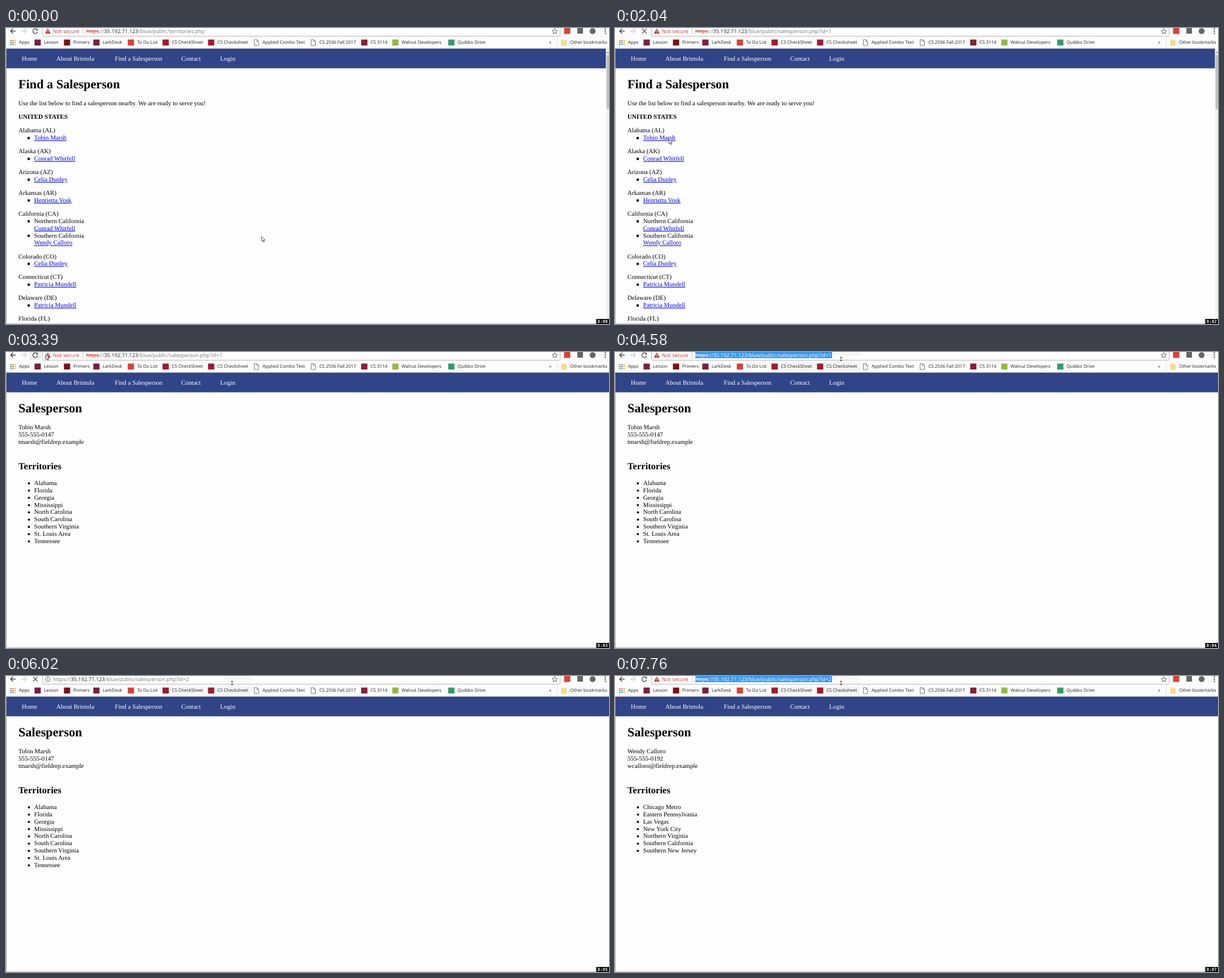
Recreate the animation shown at these times as an HTML page. Size 1067 by 525 pixels, loop 8 s.

```html
<!DOCTYPE html>
<html lang="en">
<head>
<meta charset="utf-8">
<title>Find a Salesperson</title>
<style>
html, body { margin: 0; width: 100%; height: 100%; overflow: hidden; background: #fefefe; }
svg { display: block; }
text { white-space: pre; text-rendering: geometricPrecision; }
.ui { font: 8px "Open Sans", "Noto Sans", sans-serif; fill: #222; }
.url { font: 9.25px "Open Sans", "Noto Sans", sans-serif; fill: #777; }
.page { font: 11.15px "Liberation Serif", "Times New Roman", serif; fill: #000; }
.page .h1 { font-size: 22.3px; font-weight: bold; }
.page .h2 { font-size: 16.6px; font-weight: bold; }
.page .nav { fill: #fff; }
.page .link { fill: #00e; text-decoration: underline; }
.clock { font: bold 7.4px "DejaVu Sans Mono", monospace; fill: #fff; }
</style>
</head>
<body>
<svg width="1067" height="525" viewBox="0 0 1067 525">
  <g id="chrome"></g>
  <g id="bar"></g>
  <g id="page" class="page"></g>
  <g id="top"></g>
</svg>
<script>
const LOOP = 8000, LINE = 12.86;
const $ = id => document.getElementById(id);
const text = (x, y, s, cls = '') => `<text x="${x}" y="${y}" class="${cls}">${s}</text>`;
const rect = (x, y, w, h, fill) => `<rect x="${x}" y="${y}" width="${w}" height="${h}" fill="${fill}"/>`;
const path = (d, stroke, width = 1, fill = 'none') =>
  `<path d="${d}" stroke="${stroke}" stroke-width="${width}" fill="${fill}"/>`;
const dot = (x, y, r, fill) => `<circle cx="${x}" cy="${y}" r="${r}" fill="${fill}"/>`;
const now = (steps, t) => steps.findLast(s => s[0] <= t);

// Timed states: [start, value...]
const cursors = [
  [0, 452, 369, 'arrow'], [550, 230, 268, 'arrow'], [670, 108, 209, 'arrow'], [830, 108, 212, 'arrow'],
  [980, 104, 208, 'arrow'], [1090, 99, 202, 'hand'], [1210, 97, 199, 'hand'], [1350, 95, 198, 'hand'],
  [1630, 95.5, 197, 'hand'], [1940, 95, 196, 'arrow'], [2740, 95, 223, 'arrow'], [2920, 93, 150, 'arrow'],
  [3030, 78, 50, 'arrow'], [3150, 54, 8, 'arrow'], [3270, 57, 5, 'arrow'], [3390, 70, 4, 'arrow'],
  [3510, 281, 19, 'arrow'], [3670, 395, 27, 'arrow'], [3810, 365, 25, 'arrow'], [3930, 382, 19, 'arrow'],
  [4060, 399, 17, 'arrow'], [4200, 400, 14, 'beam'], [4300, 400, 12, 'beam']
];
const addresses = [
  [0, 'territories.php'], [2040, 'salesperson.php?id=1'], [4450, 'salesperson.php?id=1', 'all'],
  [5010, 'salesperson.php?id=1', 'last'], [6020, 'salesperson.php?id=2', 'pending'],
  [6130, 'salesperson.php?id=2'], [7760, 'salesperson.php?id=2', 'all']
];
const pages = [[0, 0], [2190, 1], [6250, 2]];
const reloads = [[0, 'idle'], [1500, 'stop'], [2190, 'idle'], [3150, 'hover'], [3510, 'idle'], [6020, 'stop'], [6250, 'idle']];
const ticks = [0, 1210, 2040, 3270, 4300, 5310, 6360, 7360];

const states = [
  ['Alabama (AL)', 'Tobin Marsh'], ['Alaska (AK)', 'Conrad Whitfell'], ['Arizona (AZ)', 'Celia Dunley'],
  ['Arkansas (AR)', 'Henrietta Vosk'],
  ['California (CA)', 'Conrad Whitfell', 'Northern California', 'Wendy Calloro', 'Southern California'],
  ['Colorado (CO)', 'Celia Dunley'], ['Connecticut (CT)', 'Patricia Mundell'],
  ['Delaware (DE)', 'Patricia Mundell'], ['Florida (FL)', 'Tobin Marsh']
];
const people = [
  { lines: ['Tobin Marsh', '555-555-0147', 'tmarsh@fieldrep.example'],
    areas: ['Alabama', 'Florida', 'Georgia', 'Mississippi', 'North Carolina', 'South Carolina',
      'Southern Virginia', 'St. Louis Area', 'Tennessee'] },
  { lines: ['Wendy Calloro', '555-555-0192', 'wcalloro@fieldrep.example'],
    areas: ['Chicago Metro', 'Eastern Pennsylvania', 'Las Vegas', 'New York City', 'Northern Virginia',
      'Southern California', 'Southern New Jersey'] }
];
const bookmarks = [
  [67, 'Lesson', '#7b1e42'], [119, 'Primers', '#7d0f14'], [171, 'LarkDesk', '#7b1e42'],
  [232, 'To Do List', '#db4035'], [293.5, 'CS CheckSheet', '#a3192b'], [374, 'CS Checksheet', '#a3192b'],
  [454, 'Applied Combo Text'], [554.5, 'CS 2506 Fall 2017'], [645, 'CS 3114', '#8a1f2d'],
  [700, 'Walnut Developers', '#8fbc3f'], [799, 'Quibbo Drive', '#2f9e63']
];

function chrome() {
  let s = rect(0, 0, 1067, 37, '#fdfdfd');
  s += path('M64.5 0V12.5Q64.5 14.5 66.5 14.5H978.5Q980.5 14.5 980.5 12.5V0', '#b4b4b4', 1, '#fff');
  s += path('M17 5.5H8.5M12.5 1.2L8.2 5.5L12.5 9.8', '#444', 1.4);
  s += path('M27 5.5H36M32 1.2L36.3 5.5L32 9.8', '#d0d0d0', 1.3);
  s += path('M971 1l1.4 3.2 3.4.3-2.6 2.3.8 3.4-3-1.8-3 1.8.8-3.4-2.6-2.3 3.4-.3z', '#555', 0.9);
  s += rect(987.5, 0, 11, 10.5, '#db4035') + rect(1011, 0, 10, 10, '#666') + dot(1038, 5.5, 5.2, '#666');
  s += [1.5, 5.5, 9.5].map(y => dot(1060.5, y, 1.2, '#555')).join('');
  return s;
}

function bookmarkBar(t) {
  let s = '';
  if (t >= 3510) s += rect(273, 18, 80, 15, '#f6f6f6');
  if (t >= 3670) s += rect(354, 18, 80, 15, '#f4f4f4') + rect(384, 1, 50, 5.5, '#f5f5f5');
  const tints = ['#e2574c', '#e2574c', '#f0b429', '#3f9c5a', '#4a7fdc', '#f0b429', '#3f9c5a', '#4a7fdc', '#f0b429'];
  tints.forEach((c, i) => s += rect(7.5 + i % 3 * 3.7, 21.5 + (i / 3 | 0) * 3.4, 2.3, 2.2, c));
  s += text(23, 28.4, 'Apps');
  for (const [x, label, color] of bookmarks) {
    s += color ? rect(x - 16.5, 20.5, 11, 10.5, color)
      : path(`M${x - 14.5} 20.7h4.5l3 3v7.3h-7.5zM${x - 10} 20.7v3h3`, '#666', 0.9, '#fff');
    s += text(x, 28.4, label);
  }
  s += text(961, 28.2, '»') + rect(975, 19, 1, 13, '#ddd');
  s += path('M983 21h3.5l1 1.3h4v8.4h-8.5z', '#e8c766', 0.6, '#fbdc86');
  return `<g class="ui">${s}${text(998, 28.4, 'Other bookmarks')}</g>`;
}

function address(file, mode) {
  const all = mode == 'all', pending = mode == 'pending';
  const span = (v, fill, extra = '') => `<tspan fill="${fill}" ${extra}>${v}</tspan>`;
  const pick = c => all ? '#fff' : c;
  let s = '';
  if (pending) {
    s += `<circle cx="74" cy="5.7" r="4.3" fill="none" stroke="#666"/>` + rect(73.4, 5, 1.2, 3.2, '#666') + rect(73.4, 3, 1.2, 1.2, '#666');
  } else {
    s += path('M74 1.2L78.8 9.8H69.2z', '#c53929', 0.5, '#c53929') + rect(73.5, 4, 1, 3, '#fff') + rect(73.5, 7.8, 1, 1, '#fff');
    s += `<text x="83" y="9.1" style="fill:#c53929">Not secure</text>` + rect(136, 0, 1, 11, '#ccc');
  }
  if (all) s += rect(142, 0, 242, 11, '#3399ff');
  if (mode == 'last') s += rect(378, 0, 6, 11, '#3399ff');
  const head = file.slice(0, -1), tail = file.slice(-1);
  s += `<text x="${pending ? 83 : 142}" y="9.1">`
    + span('https', pick(pending ? '#777' : '#c53929'), pending ? '' : 'text-decoration="line-through"')
    + span('://', pick('#777')) + span('35.192.71.123', pick('#222'))
    + span('/blue/public/' + head, pick('#777')) + span(tail, mode == 'last' ? '#fff' : pick('#777')) + '</text>';
  return `<g class="url">${s}</g>`;
}

function reload(mode) {
  if (mode == 'stop') return path('M48 1.5L56 9.5M56 1.5L48 9.5', '#555', 1.3);
  return (mode == 'hover' ? rect(42, 0, 20, 14, '#ececec') : '')
    + path('M55 2.6A4.2 4.2 0 1 0 56 6.6', '#444', 1.3) + path('M56.4 .8V4.4H52.8z', 'none', 0, '#444');
}

function page(n) {
  let s = rect(0, 37, 1067, 488, '#fefefe') + rect(0, 36.5, n ? 1067 : 1061.5, 35, '#304488');
  [[28, 'Home'], [89, 'About Brintola'], [192.5, 'Find a Salesperson'], [310, 'Contact'], [379, 'Login']]
    .forEach(([x, label]) => s += text(x, 58.2, label, 'nav'));
  s += n ? person(people[n - 1]) : territories();
  return s + rect(0, 36, 1, 489, '#a8a8a8') + rect(0, 524, 1067, 1, '#b8b8b8');
}

function territories() {
  let y = 185.4;
  let s = text(22, 106.7, 'Find a Salesperson', 'h1')
    + text(22, 137.4, 'Use the list below to find a salesperson nearby. We are ready to serve you!')
    + `<text x="22" y="161.3" font-weight="bold">UNITED STATES</text>`;
  for (const [state, ...entries] of states) {
    s += text(22, y, state);
    for (let i = 0; i < entries.length; i += 2) {
      y += LINE;
      s += rect(38.2, y - 5, 4, 4, '#000');
      if (entries[i + 1]) {
        s += text(49.8, y, entries[i + 1]);
        y += LINE;
      }
      s += text(49.8, y, entries[i], 'link');
    }
    y += 24.05;
  }
  return s + rect(1062, 36, 5, 489, '#f1f1f1') + rect(1062.6, 48, 4.4, 95.5, '#c1c1c1')
    + path('M1063 44.5l2-2.5 2 2.5z', 'none', 0, '#777');
}

function person({ lines, areas }) {
  let s = text(22, 106.7, 'Salesperson', 'h1') + text(22, 207.8, 'Territories', 'h2');
  lines.forEach((l, i) => s += text(22, 137.4 + i * LINE, l));
  areas.forEach((a, i) => s += dot(40.5, 233 + i * LINE, 1.9, '#000') + text(49.8, 236 + i * LINE, a));
  return s;
}

const shapes = {
  arrow: path('M.5 .5V9.3L2.5 7.6L3.9 10.7L5.2 10.1L3.8 7.1H6.5z', '#222', 0.75, '#fff'),
  hand: path('M-1.2 8V1.2Q-1.2 .3-.3 .3T.6 1.2V5Q1.6 4.2 2.3 5.3Q3.4 4.6 4 5.8Q5.4 5.3 5.5 6.8V9.5Q5.5 11 4.4 12V13.6H-1V12.4L-3.6 8.6Q-4 7.4-2.9 7.1Q-2 7-1.2 8.4', '#222', 0.8, '#fff'),
  beam: path('M-2 -2.6H2M0 -2.6V3.4M-2 3.4H2', '#333', 0.9)
};

function overlay([, x, y, kind], seconds) {
  return rect(1044.5, 516, 22.5, 9, '#000') + text(1046.8, 523, '0:0' + seconds, 'clock')
    + `<g transform="translate(${x} ${y})">${shapes[kind]}</g>`;
}

const shown = {};
function show(id, html) {
  if (shown[id] !== html) $(id).innerHTML = shown[id] = html;
}

const start = performance.now();
show('chrome', chrome());
function draw() {
  const t = (performance.now() - start) % LOOP;
  const [, file, mode] = now(addresses, t);
  show('bar', bookmarkBar(t) + reload(now(reloads, t)[1]) + address(file, mode));
  show('page', page(now(pages, t)[1]));
  show('top', overlay(now(cursors, t), ticks.filter(k => k <= t).length - 1));
  requestAnimationFrame(draw);
}
draw();
</script>
</body>
</html>
```
